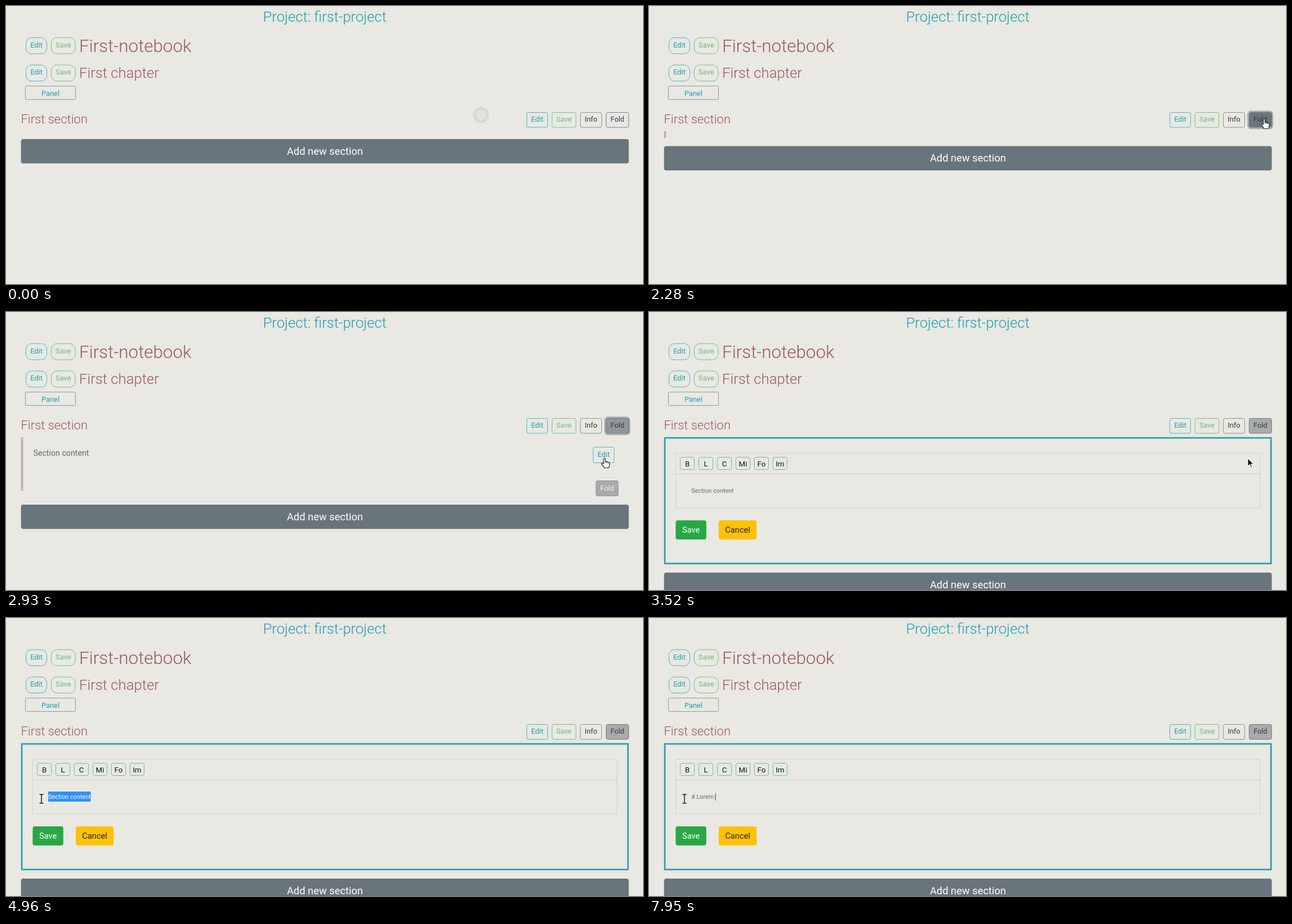
An HTML page with a canvas that plays this animation: 1132x495 px, repeating every 8 s.

```html
<!DOCTYPE html>
<html lang="en">
<head>
<meta charset="utf-8">
<title>Notebook editor</title>
<style>
  html, body { margin: 0; width: 100%; height: 100%; overflow: hidden; background: #e9e8e2; }
  canvas { display: block; }
</style>
</head>
<body>
<canvas id="stage" width="1132" height="495"></canvas>
<script>
const ctx = document.getElementById('stage').getContext('2d');
const LOOP = 8000;
const BG = '#e9e8e2', TEAL = '#1c9fb6', OUTLINE = '#3db3c5', GREEN = '#28a745', GRAY = '#6c757d',
      DARK = '#343a40', RED = '#9f565d', PALE = '#a9abab', YELLOW = '#ffc107';

const FOLD_CLICK = 2192, EDIT_CLICK = 3200, SELECT = 4960;
const TYPED = '# Lorem ';
const KEY_TIMES = [6060, 6520, 7040, 7300, 7500, 7600, 7690, 7950];

// time, x, y of the pointer's hot spot
const POINTER = [
  [0, 844, 194], [1110, 844, 194], [1700, 1078, 192], [1890, 1093, 200],
  [2480, 1094, 201], [2740, 1094, 201], [2930, 1064, 260], [3590, 1064, 260],
  [4040, 231, 329], [4430, 90, 325], [4760, 63, 322]
];

const clamp = v => Math.max(0, Math.min(1, v));
const progress = (t, start, length) => clamp((t - start) / length);
const swing = p => 0.5 - Math.cos(p * Math.PI) / 2;

function rect(x, y, w, h, r, fill, stroke, line = 0.92) {
  ctx.beginPath();
  ctx.roundRect(x, y, w, h, r);
  if (fill) { ctx.fillStyle = fill; ctx.fill(); }
  if (stroke) { ctx.strokeStyle = stroke; ctx.lineWidth = line; ctx.stroke(); }
}

// y is the middle of the capital letters
function text(str, x, y, size, color, align = 'left', weight = 400) {
  ctx.font = `${weight} ${size}px Roboto, sans-serif`;
  ctx.textAlign = align;
  ctx.fillStyle = color;
  ctx.fillText(str, x, y + size * 0.3555);
}

function button(label, x, y, w, h, { color = DARK, border = color, fill, r = 3, size = 12.83, lift = 0.5, alpha = 1 } = {}) {
  ctx.globalAlpha = alpha;
  rect(x, y, w, h, r, fill, border);
  text(label, x + w / 2, y + h / 2 - lift, size, color, 'center');
  ctx.globalAlpha = 1;
}

function header() {
  text('Project: first-project', 566.5, 19, 25.67, TEAL, 'center', 300);
  for (const y of [56.3, 105]) {
    button('Edit', 35.5, y, 37, 28.7, { color: TEAL, border: OUTLINE, r: 10, lift: 1.5 });
    button('Save', 80.4, y, 42.7, 28.7, { color: GREEN, r: 10, lift: 1.5, alpha: 0.65 });
  }
  text('First-notebook', 130, 70.5, 31.4, RED, 'left', 300);
  text('First chapter', 130, 119, 25.67, RED, 'left', 300);
  button('Panel', 34.5, 142.5, 89, 24, { color: TEAL, border: '#8d9194', r: 2, lift: -1 });
}

function sectionRow(t) {
  text('First section', 26.4, 201.5, 22, RED, 'left', 300);
  button('Edit', 925.5, 189.5, 37, 26.5, { color: TEAL, border: OUTLINE, lift: 1 });
  button('Save', 970.4, 189.5, 42.5, 26.5, { color: GREEN, lift: 1, alpha: 0.65 });
  button('Info', 1020.7, 189.5, 37.8, 26.5, { border: '#858a8d', lift: 1 });

  if (t >= FOLD_CLICK && t < EDIT_CLICK)
    rect(1064.7, 187.7, 43.3, 30.2, 5, null, 'rgba(108,117,125,.5)', 2.75);
  const hover = progress(t, 1680, 150), leave = progress(t, 2840, 150);
  if (leave) rect(1066.5, 189.5, 40, 26.5, 3, PALE);
  ctx.globalAlpha = hover * (1 - leave);
  rect(1066.5, 189.5, 40, 26.5, 3, GRAY);
  ctx.globalAlpha = 1;
  button('Fold', 1066.5, 189.5, 40, 26.5, { border: GRAY, lift: 1 });
}

function content(height) {
  ctx.save();
  ctx.beginPath();
  ctx.rect(0, 222.5, 1132, height);
  ctx.clip();
  rect(26.8, 222.5, 3.6, 96, 0, '#c4a9aa');
  text('Section content', 48.5, 250.8, 14.2, '#66686a');
  button('Edit', 1043.5, 240.5, 37, 28, { color: TEAL, border: OUTLINE, lift: 1 });
  button('Fold', 1048.5, 300.5, 39.5, 27, { color: '#f4f4f2', border: '#8b9093', fill: PALE, lift: 1 });
  ctx.restore();
}

function editor(t) {
  rect(28.1, 224.1, 1077.2, 223.8, 0, null, '#2a9fb3', 2.75);
  rect(47.5, 251.5, 1038, 97, 0, null, '#d0d1ce');
  rect(47.5, 288, 1038, 1, 0, '#d0d1ce');
  ['B', 'L', 'C', 'Mi', 'Fo', 'Im'].forEach((label, i) =>
    button(label, 55.5 + i * 32.95, 258.7, 25.2, 21.8, { color: '#111', border: '#62b2c0', size: 13.3, lift: -0.5 }));
  button('Save', 47.9, 371.4, 53.4, 33.2, { color: '#fff', border: GREEN, fill: GREEN, size: 14.67, lift: 0.3 });
  button('Cancel', 124.4, 371.4, 66.4, 33.2, { color: '#212529', border: YELLOW, fill: YELLOW, size: 14.67, lift: 0.3 });

  const count = KEY_TIMES.filter(k => t >= k).length;
  const selected = t >= SELECT && !count;
  if (selected) rect(75, 309, 75.5, 18, 0, '#338fff');
  const line = count ? TYPED.slice(0, count) : 'Section content';
  text(line, 75.2, 317.8, 10.8, selected ? '#fff' : '#696b6c');
  if (count) rect(75.2 + ctx.measureText(line).width - 0.3, 312, 1, 13, 0, '#444');
}

const SHAPES = {
  arrow: new Path2D('M0 0V15L3.5 11.8 5.8 17 8 16 5.7 11H10.5Z'),
  hand: new Path2D('M-2 1.5Q-2 0-.5 0Q1 0 1 1.5V6.5Q2.5 5.5 3.5 7Q5 6.2 6 7.7Q8 7.2 8.5 9V13' +
    'Q8.3 15 7 17.5H-1Q-2 15-5 11.5Q-6.5 9.5-5 9Q-3.5 8.5-2 10.5Z'),
  beam: new Path2D('M-3.5-8Q0-8 0-6.5Q0-8 3.5-8M0-6.5V6.5M-3.5 8Q0 8 0 6.5Q0 8 3.5 8')
};

function pointerAt(t) {
  const next = POINTER.findIndex(p => p[0] > t);
  if (next < 0) return POINTER.at(-1).slice(1);
  const [t0, x0, y0] = POINTER[next - 1], [t1, x1, y1] = POINTER[next];
  const p = swing((t - t0) / (t1 - t0));
  return [x0 + (x1 - x0) * p, y0 + (y1 - y0) * p];
}

function pointer(t) {
  const [x, y] = pointerAt(t);
  ctx.save();
  ctx.translate(x, y);
  ctx.lineJoin = 'round';
  if (t < 130) {
    rect(-14, -14, 28, 28, 14, '#d5d7d8');
    rect(-9.5, -9.5, 19, 19, 9.5, '#e2e3e1', '#dcdedd');
  } else if (t >= 3720) {
    ctx.strokeStyle = '#111';
    ctx.lineWidth = 1.4;
    ctx.stroke(SHAPES.beam);
  } else {
    const overButton = t >= 1680 && t < EDIT_CLICK;
    const shape = overButton ? SHAPES.hand : SHAPES.arrow;
    ctx.fillStyle = overButton ? '#fff' : '#111';
    ctx.strokeStyle = overButton ? '#222' : '#fff';
    ctx.lineWidth = 1.2;
    ctx.fill(shape);
    ctx.stroke(shape);
    if (overButton) {
      ctx.lineWidth = 0.8;
      ctx.stroke(new Path2D('M1 6.5V9M3.5 7V9.3M6 7.7V9.6'));
    }
  }
  ctx.restore();
}

function draw(t) {
  rect(0, 0, 1132, 495, 0, BG);
  header();
  sectionRow(t);
  const editing = t >= EDIT_CLICK;
  const height = editing ? 227 : 106 * swing(progress(t, FOLD_CLICK, 400));
  if (editing) editor(t);
  else if (height) content(height);
  const top = 237 + height;
  rect(26.7, top, 1080, 43.3, 4, '#69757d');
  text('Add new section', 566.7, top + 21.4, 18.33, '#fff', 'center');
  pointer(t);
}

function tick() {
  draw(performance.now() % LOOP);
  requestAnimationFrame(tick);
}
tick();
</script>
</body>
</html>
```
